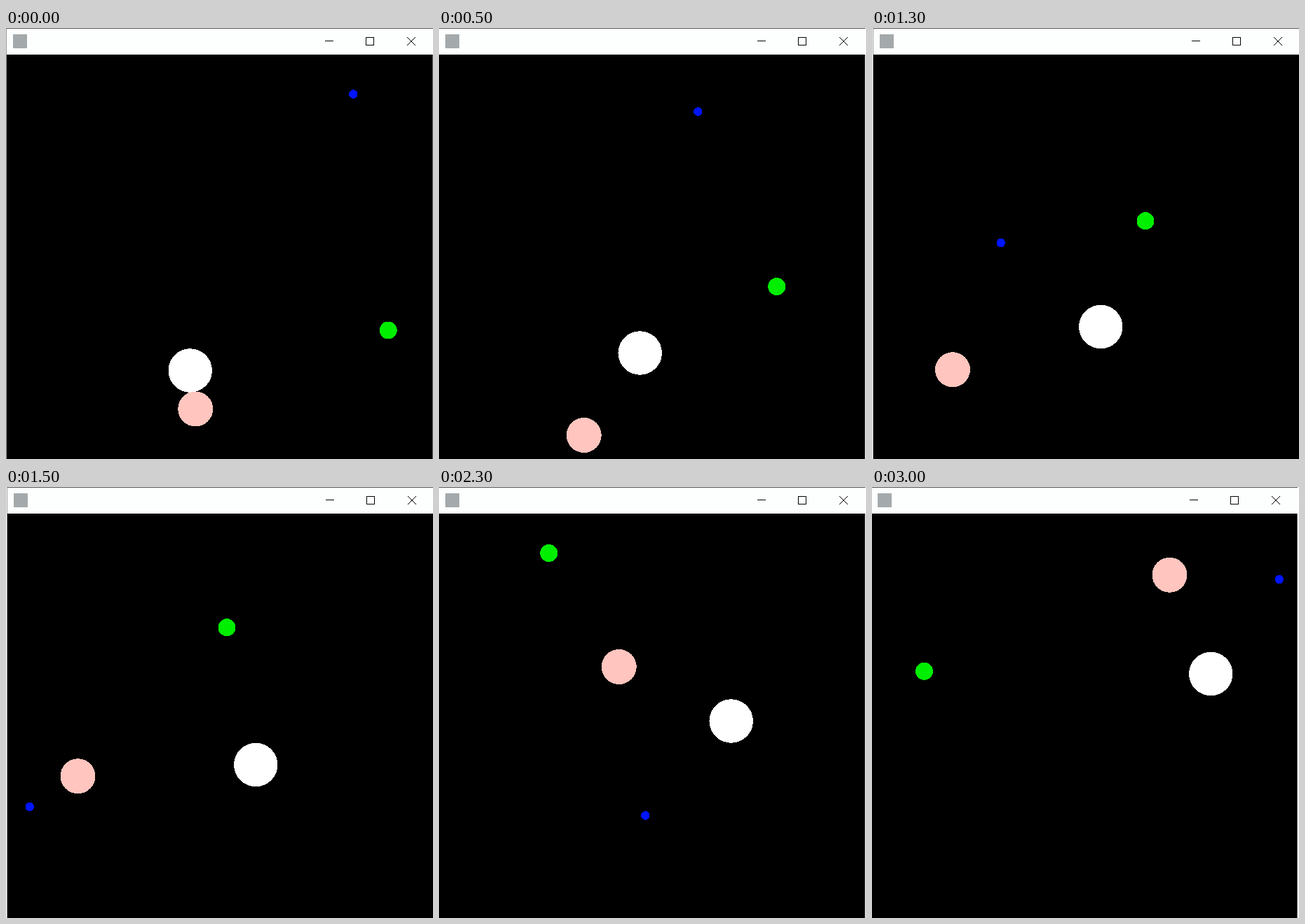
Animation of 609 by 616 pixels, one loop 3500 ms. Source, as an HTML page:

```html
<!DOCTYPE html>
<html lang="en">
<head>
<meta charset="utf-8">
<title>Bouncing balls</title>
<style>
  html, body { margin: 0; width: 100%; height: 100%; overflow: hidden; background: #fff; }
  svg { display: block; width: 609px; height: 616px; shape-rendering: crispEdges; }
</style>
</head>
<body>
<svg viewBox="0 0 609 616">
  <g id="win">
    <rect width="608" height="616"/>
    <rect width="608" height="38" fill="#fdfffe"/>
    <rect width="609" height="1" fill="#555"/>
    <rect width="1" height="616" fill="#999"/>
    <rect x="608" y="38" width="1" height="578" fill="#666"/>
    <rect x="10" y="9" width="20" height="20" fill="#a4aaab"/>
    <g fill="none" stroke="#000">
      <path d="M455 18.5h12M513.5 13.5h11v11h-11z"/>
      <path d="M572 13l12 12M584 13l-12 12" shape-rendering="auto"/>
    </g>
    <g id="balls" transform="translate(-4.75 32) scale(1.25)"></g>
  </g>
</svg>
<script>
const STEP = 500;
const WIDTH = 490, HEIGHT = 470;

// Simulation ticks passed, and the window's sideways jitter, at each step
const ticks = [0, 10, 25, 37, 62, 76, 89];
const jitter = [0, -1, 1, 1, -1, -1, -2];

// Top left corner, velocity and radius, back to front
const balls = [
  { x: 189, y: 341, vx: 2, vy: -2, r: 25, fill: '#fff' },
  { x: 200, y: 390, vx: -5, vy: 5, r: 20, fill: '#ffc5be' },
  { x: 430, y: 310, vx: -5, vy: -5, r: 10, fill: '#00ee00' },
  { x: 395, y: 45, vx: -10, vy: -10, r: 5, fill: '#0014ff' }
];

const set = (el, attrs) => {
  for (const key in attrs) el.setAttribute(key, attrs[key]);
};

const win = document.getElementById('win');
const dots = balls.map(({ r, fill }) => {
  const dot = document.createElementNS('http://www.w3.org/2000/svg', 'circle');
  set(dot, { r, fill });
  document.getElementById('balls').append(dot);
  return dot;
});

// Move along one axis, turning back within a diameter of either wall
function travel(pos, v, size, limit, count) {
  for (let i = 0; i < count; i++) {
    pos += v;
    if (pos <= size || pos >= limit - size) v = -v;
  }
  return pos;
}

function show(step) {
  set(win, { transform: `translate(${jitter[step]} 0)` });
  balls.forEach(({ x, y, vx, vy, r }, i) => set(dots[i], {
    cx: travel(x, vx, 2 * r, WIDTH, ticks[step]) + r,
    cy: travel(y, vy, 2 * r, HEIGHT, ticks[step]) + r
  }));
}

const start = performance.now();
let shown = -1;

function draw(now) {
  const step = Math.floor(Math.max(0, now - start) / STEP) % ticks.length;
  if (step !== shown) show(shown = step);
  requestAnimationFrame(draw);
}

draw(start);
</script>
</body>
</html>
```
